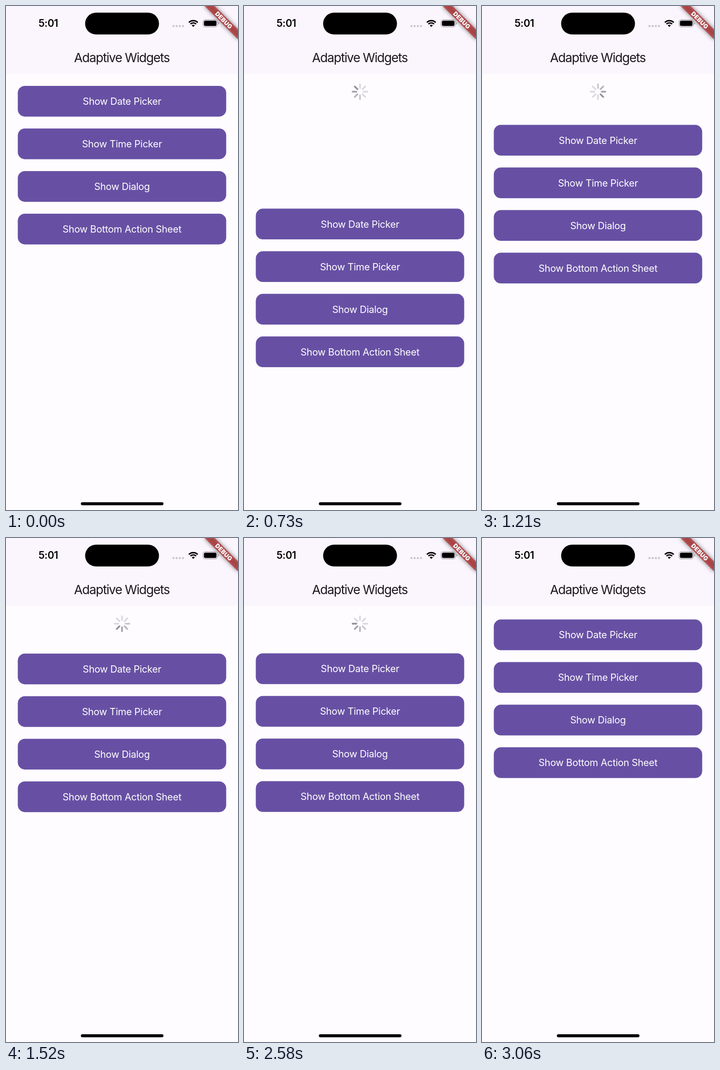
Write an HTML page that moves like this. It is 480x1041 px and loops after 3.09 s.

```html
<!DOCTYPE html>
<html lang="en">
<head>
<meta charset="utf-8">
<title>Adaptive Widgets</title>
<style>
  html, body { margin: 0; width: 100%; height: 100%; overflow: hidden; background: #fefcff; }
  svg { display: block; width: 100%; height: 100%; }
  text { font-family: Inter, Roboto, sans-serif; text-anchor: middle; }
  .title { font-size: 26px; letter-spacing: -1.2px; fill: #1b181e; }
  .clock { font-size: 20.8px; font-weight: 600; letter-spacing: -.3px; }
  .label { font-size: 20px; letter-spacing: -.25px; fill: #fff; }
  .debug { font-size: 12.46px; font-weight: 900; letter-spacing: .2px; fill: #fff; }
</style>
</head>
<body>
<svg viewBox="0 0 480 1041" preserveAspectRatio="none">
  <defs>
    <filter id="blur" x="-50%" y="-150%" width="200%" height="400%">
      <feGaussianBlur stdDeviation="4.8"/>
    </filter>
  </defs>
  <rect width="480" height="1041" fill="#fefcff"/>
  <rect width="480" height="140" fill="#fbf5fd"/>

  <text class="clock" x="87.5" y="43.4">5:01</text>
  <rect x="163.7" y="13.8" width="152.8" height="45" rx="22.5"/>
  <g fill="#c9c4cc">
    <circle cx="346.5" cy="41.4" r="2.2"/>
    <circle cx="353" cy="41.4" r="2.2"/>
    <circle cx="359.6" cy="41.4" r="2.2"/>
    <circle cx="366.1" cy="41.4" r="2.2"/>
  </g>
  <g fill="none" stroke="#000" stroke-width="2.9">
    <path d="M378.3 34A13 13 0 0 1 396.7 34"/>
    <path d="M381.6 37.3A8.3 8.3 0 0 1 393.4 37.3"/>
  </g>
  <path d="M387.5 43.2L384.3 40A4.5 4.5 0 0 1 390.7 40Z"/>
  <rect x="407.6" y="28.3" width="30" height="14.8" rx="4.6" fill="none" stroke="#a4a0a6" stroke-width="1.2"/>
  <rect x="409.5" y="30.2" width="26" height="11" rx="3"/>
  <path d="M439.2 33.3A2.6 2.6 0 0 1 439.2 38.2Z" fill="#a4a0a6"/>

  <text class="title" x="239.6" y="116">Adaptive Widgets</text>
  <g id="spinner"></g>
  <g id="buttons"></g>
  <rect x="154.8" y="1025" width="171" height="6.2" rx="3.1"/>

  <g transform="translate(480 0) rotate(45)">
    <rect x="-48.9" y="34.2" width="97.8" height="14.66" fill-opacity=".5" filter="url(#blur)"/>
    <rect x="-48.9" y="34.2" width="97.8" height="14.66" fill="#b71c1c" fill-opacity=".627"/>
    <text class="debug" x="0" y="46">DEBUG</text>
  </g>
</svg>
<script>
const LOOP = 3090;
const PULL = 570, ARMED = 665, RELEASE = 777, DONE = 2665;
const PEAK = 292, REST = 73.3, TRIGGER = 122.1;
const RADIUS = 17.1, TICKS = 8;
const TICK_ALPHAS = [47, 47, 47, 47, 72, 97, 122, 147];
const STEP = 30, STEP_STARTS = [2580, 1520, 580];

const spinner = document.getElementById('spinner');
const buttons = document.getElementById('buttons');

function add(parent, name, attributes, text = '') {
  const node = document.createElementNS('http://www.w3.org/2000/svg', name);
  for (const key in attributes) node.setAttribute(key, attributes[key]);
  node.textContent = text;
  return parent.appendChild(node);
}

['Show Date Picker', 'Show Time Picker', 'Show Dialog', 'Show Bottom Action Sheet'].forEach((label, i) => {
  const y = 164.9 + i * 88;
  add(buttons, 'rect', { x: 24.4, y, width: 431.2, height: 63.5, rx: 14.7, fill: '#6750a4' });
  add(buttons, 'text', { class: 'label', x: 240, y: y + 39.1 }, label);
});

// Ticks are drawn for a unit radius; the group is scaled.
const ticks = Array.from({ length: TICKS }, (_, i) => add(spinner, 'rect', {
  x: -.1, y: -1, width: .2, height: 2 / 3, rx: .1, fill: '#3c3c44', transform: `rotate(${i * 45})`
}));

const clamp = v => Math.min(1, Math.max(0, v));
const smooth = u => u * u * (3 - 2 * u);

// Overdamped spring released at rest: 1 falling to 0.
function spring(ms) {
  const omega = Math.sqrt(200), root = Math.sqrt(1.1 ** 2 - 1);
  const slow = omega * (1.1 - root), fast = omega * (1.1 + root), s = ms / 1000;
  return (fast * Math.exp(-slow * s) - slow * Math.exp(-fast * s)) / (fast - slow);
}

function offsetAt(t) {
  if (t < RELEASE) return PEAK * smooth(clamp((t - PULL) / (RELEASE - PULL)));
  if (t < DONE) return REST + (PEAK - REST) * spring(t - RELEASE);
  return REST * spring(t - DONE);
}

function stepped(t) {
  const start = STEP_STARTS.find(s => s <= t);
  return start === undefined ? 0 : start + Math.floor((t - start) / STEP) * STEP;
}

function draw(now) {
  const t = stepped(now % LOOP);
  const offset = offsetAt(t);
  const progress = clamp(offset / TRIGGER);
  const dragging = t < ARMED;
  const active = Math.floor((t - ARMED) / 1000 * TICKS);

  buttons.setAttribute('transform', `translate(0 ${offset.toFixed(2)})`);
  spinner.setAttribute('transform', `translate(240 177) scale(${RADIUS * (t < DONE ? 1 : progress)})`);
  spinner.setAttribute('opacity', dragging ? smooth(clamp(progress / .35)) : 1);
  ticks.forEach((tick, i) => {
    const alpha = dragging
      ? (i < TICKS * progress ? 147 : 0)
      : TICK_ALPHAS[(((i - active) % TICKS) + TICKS) % TICKS];
    tick.setAttribute('fill-opacity', alpha / 255);
  });
}

const begin = performance.now();
function frame() {
  draw(performance.now() - begin);
  requestAnimationFrame(frame);
}
frame();
</script>
</body>
</html>
```
